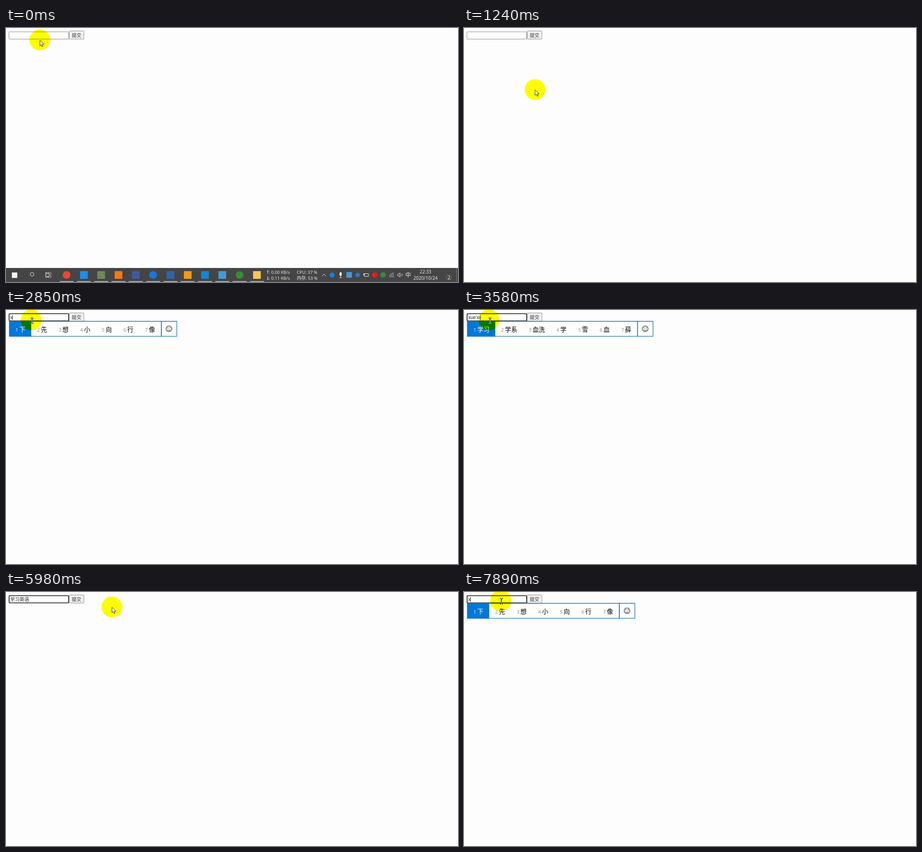
An HTML page with a canvas that plays this animation: 998x561 px, repeating every 8000 ms.

```html
<!DOCTYPE html>
<html lang="zh-CN">
<head>
<meta charset="utf-8">
<title>拼音输入</title>
<style>
  html, body { margin: 0; width: 100%; height: 100%; overflow: hidden; background: #fdfdfd; }
  canvas { display: block; width: 998px; height: 561px; }
</style>
</head>
<body>
<canvas id="stage" width="998" height="561"></canvas>
<script>
const ctx = document.getElementById('stage').getContext('2d');
const LOOP = 8000;
const CJK = '"Noto Sans CJK SC", "Noto Sans CJK", sans-serif';
const FIELD = '10.4px "Liberation Sans", ' + CJK;
const UI = '"Open Sans", "Noto Sans", ' + CJK;
const WHITE = '#f4f4f4';

const TASKBAR_END = 790;
const FOCUS_IN = 1800, SUBMIT = 6240, FOCUS_AGAIN = 7320;
const CLICKS = [705, FOCUS_IN, SUBMIT, FOCUS_AGAIN];

// each move: start, duration, end point
const MOVES = [
  [40, 260, 45, 22], [440, 260, 181, 163], [1100, 500, 57, 24], [1700, 100, 55.5, 22],
  [5780, 200, 234, 33], [6050, 150, 156, 17], [6350, 230, 318, 38], [6630, 340, 81, 19]
];

// one key per step; the text is committed at `end`
const WORDS = [
  { start: 2760, step: 205, end: 3680, before: '', done: '学习', keys: [
    ['x', '下 先 想 小 向 行 像'],
    ['xu', '需 许 续 徐 序 须 虚'],
    ['xue', '学 雪 血 薛 穴 靴 削'],
    ["xue'x", '学校 学习 学系 血型 学习下 学习者 雪下'],
    ["xue'xi", '学习 学系 血洗 学 雪 血 薛']] },
  { start: 4140, step: 128, end: 4950, before: '学习', done: '学习英语', keys: [
    ['y', '一 有 也 要 以 又 用'],
    ['yi', '一 以 已 亿 意 易 依'],
    ['yin', '因 音 引 印 银 饮 阴'],
    ['ying', '应 英 赢 影 * 硬 营'],
    ["ying'y", '应用 英语 营业 影院 英语课 营养学 应用题'],
    ["ying'yu", '英语 应于 盈余 应与 硬玉 英 应']] },
  { start: 7760, step: 200, end: LOOP, before: '', done: '', keys: [
    ['x', '下 先 想 小 向 行 像']] }
];

function rect(x, y, w, h, color) {
  ctx.fillStyle = color;
  ctx.fillRect(x, y, w, h);
}

function box(x, y, w, h, color, width = 1, radius = 0) {
  ctx.strokeStyle = color;
  ctx.lineWidth = width;
  ctx.beginPath();
  ctx.roundRect(x, y, w, h, radius);
  ctx.stroke();
}

function disc(x, y, r, color, ry = r, tilt = 0) {
  ctx.fillStyle = color;
  ctx.beginPath();
  ctx.ellipse(x, y, r, ry, tilt, 0, 7);
  ctx.fill();
}

function ring(x, y, r, color, width = 1, from = 0, to = Math.PI * 2) {
  ctx.strokeStyle = color;
  ctx.lineWidth = width;
  ctx.beginPath();
  ctx.arc(x, y, r, from, to);
  ctx.stroke();
}

function path(x, y, d, stroke, width = 1, fill) {
  const shape = new Path2D(d);
  ctx.save();
  ctx.translate(x, y);
  if (fill) {
    ctx.fillStyle = fill;
    ctx.fill(shape);
  }
  ctx.strokeStyle = stroke;
  ctx.lineWidth = width;
  ctx.stroke(shape);
  ctx.restore();
}

function text(str, x, y, font, color, align = 'left') {
  ctx.font = font;
  ctx.fillStyle = color;
  ctx.textAlign = align;
  ctx.fillText(str, x, y);
}

function fieldWidth(str) {
  ctx.font = FIELD;
  return ctx.measureText(str).width;
}

function pointerAt(t) {
  let x = 75, y = 26.5;
  for (const [start, time, toX, toY] of MOVES) {
    const k = Math.min(1, Math.max(0, (t - start) / time));
    const ease = k * k * (3 - 2 * k);
    x += (toX - x) * ease;
    y += (toY - y) * ease;
  }
  return [x, y];
}

// field content, time of the last edit, and the open popup if any
function typingAt(t) {
  if (t >= SUBMIT && t < WORDS[2].start) return { value: '', since: FOCUS_AGAIN };
  const word = WORDS.filter(w => w.start <= t).pop();
  if (!word) return { value: '', since: FOCUS_IN };
  if (t >= word.end) return { value: word.done, since: word.end };
  const i = Math.min(word.keys.length - 1, Math.floor((t - word.start) / word.step));
  const [keys, list] = word.keys[i];
  return { value: word.before + keys, since: t, left: Math.floor(7 + fieldWidth(word.before)), list };
}

function drawForm(t, { value, since }) {
  const focused = t >= FOCUS_AGAIN || t >= FOCUS_IN && t < SUBMIT;
  rect(6, 8, 133, 17, '#fefefe');
  if (focused) box(6.8, 8.3, 131.6, 15.7, '#101010', 1.6, 1.5);
  else box(6.5, 8.5, 132, 16, '#8a8a8a', 1, 1);
  rect(139, 6.5, 33, 18.5, '#efefef');
  box(139.5, 6.5, 32.5, 18, '#8e8e8e', 1, 1);
  text('提交', 145.3, 20, '10.4px ' + CJK, '#333');
  text(value, 9.3, 20, FIELD, '#222');
  if (focused && (t - since) % 1060 < 530) {
    rect(Math.round(9.3 + fieldWidth(value)), 11, 0.9, 11, '#222');
  }
}

function drawBird(x, y) {
  disc(x, y + 1, 8, '#3b2a20', 4, -0.5);
  disc(x, y + 1, 7, '#8a4f2c', 3, -0.5);
  disc(x - 1, y - 2, 6, '#8a4f2c', 2.2, -0.3);
  disc(x + 5.5, y - 2.5, 2, '#e6e0da');
}

function drawSmile(x, y) {
  ring(x, y, 6.3, '#111', 1.1);
  ring(x, y + 0.3, 3.5, '#111', 1, 0.4, Math.PI - 0.4);
  for (const side of [-1, 1]) disc(x + side * 2.3, y - 2, 0.9, '#111');
}

function drawPopup(left, list) {
  const items = list.split(' ');
  const widths = items.map(s => s === '*' ? 53 : 34.3 + 13.4 * s.length);
  const sep = left + widths.reduce((a, b) => a + b) + 2;
  rect(left, 25, sep + 35 - left, 33.5, '#fdfdfd');
  rect(left, 25, widths[0] + 1, 33.5, '#0078d7');
  let x = left + 14;
  items.forEach((item, i) => {
    text(i + 1, x, 47.5, '10px ' + UI, i ? '#858585' : '#fff');
    if (item === '*') drawBird(x + 17.5, 43.5);
    else text(item, x + 8.2, 48.3, '13.6px ' + CJK, i ? '#000' : '#fff');
    x += widths[i];
  });
  drawSmile(sep + 17, 41.5);
  box(left + 0.3, 25, sep - left, 33.2, '#1874bd', 1.3);
  box(sep, 25, 34.3, 33.2, '#1874bd', 1.3);
}

const APPS = '#e94a35 #1f8eea #6d8a58 #f07b12 #4458a0 #1677dc #2f64ad #f59a19 #1787d0 #419bd0 #3a8c35 #f5c758'.split(' ');

const TRAY = [
  x => disc(x, 545.5, 5.5, '#1681d8'),
  x => {
    disc(x, 543.5, 2.4, WHITE, 4.2);
    rect(x - 0.5, 547, 1, 4, WHITE);
    rect(x - 2.5, 551, 5, 1, WHITE);
  },
  x => rect(x - 6.2, 539, 12.5, 12.5, '#4297d8'),
  x => disc(x, 545.5, 5, '#2f78c4'),
  x => {
    box(x - 4, 542.5, 9, 6, WHITE);
    rect(x - 6, 542, 2, 4, WHITE);
  },
  x => disc(x, 545.5, 6, '#ee1a1a'),
  x => disc(x, 545.5, 6, '#3a8c35'),
  x => [1, 3.5, 6.5, 9.5].forEach(r => ring(x + 4.5, 550.5, r, '#d0d0d0', 1, Math.PI, Math.PI * 1.5)),
  x => {
    path(x, 545.5, 'M-5.5 -2h2l3 -2.5v9l-3 -2.5h-2z', WHITE, 0.9);
    [2.5, 5].forEach(r => ring(x, 545.5, r, '#d0d0d0', 0.9, -0.8, 0.8));
  }
];

function drawRate(y, dir, rate) {
  path(578, y, `M0 -3.7V3.7M-2 ${dir * 1.7}L0 ${dir * 3.7}L2 ${dir * 1.7}`, WHITE);
  text(`: ${rate} KB/s`, 580.5, y + 3.5, '9.5px ' + UI, WHITE);
}

function drawTaskbar() {
  rect(0, 530, 998, 31, '#454546');
  rect(13, 540, 12, 12, WHITE);
  ring(57.5, 544, 4, WHITE);
  path(54.6, 547, 'l-4 4.5', WHITE, 1.2);
  box(87.5, 542.5, 8, 6, WHITE);
  path(87.5, 539, 'M0 0v1.5h8v-1.5M0 13v-1.5h8v1.5M11.3 0v13', WHITE, 0.9);

  APPS.forEach((color, i) => {
    const x = 133.8 + i * 38.2;
    if (i % 5) rect(x - 8.5, 537, 17, 17, color);
    else disc(x, 545.5, 8.5, color);
    rect(x - 15.5, 559, 31, 2, '#76b9ed');
  });

  drawRate(539.2, -1, '0.00');
  drawRate(552.2, 1, '0.11');
  text('CPU: 37 %', 642, 542.7, '9.7px ' + UI, WHITE);
  text('内存: 53 %', 642, 555.7, '9.7px ' + UI, WHITE);

  path(702, 543.5, 'M-4.5 4.5L0 0l4.5 4.5', WHITE);
  TRAY.forEach((icon, i) => icon(720 + i * 18.8));
  text('中', 888, 550, '12px ' + CJK, WHITE, 'center');
  text('22:33', 926.3, 542, '10px ' + UI, WHITE, 'center');
  text('2020/10/24', 926.3, 555.7, '10.1px ' + UI, WHITE, 'center');

  path(966, 539.5, 'h13v10h-6l-3.5 3v-3h-3.5z', WHITE, 0.5, WHITE);
  for (let y = 542; y < 548; y += 2.5) rect(968, y, 9, 0.8, '#555');
  disc(978, 551, 6, '#454546');
  ring(978, 551, 5.5, '#8a8a8a', 0.8);
  text('2', 978, 554.6, '10px ' + UI, '#fff', 'center');
  rect(994.5, 530, 1, 31, '#858585');
}

function drawIBeam(x, y) {
  const cx = Math.round(x + 1), top = Math.round(y - 5.5);
  ctx.globalCompositeOperation = 'difference';
  for (const edge of [top, top + 12]) {
    rect(cx - 3, edge, 3, 1, '#fff');
    rect(cx + 1, edge, 3, 1, '#fff');
  }
  rect(cx - 0.3, top + 1, 1.6, 11, '#fff');
  ctx.globalCompositeOperation = 'source-over';
}

function drawPointer(t) {
  const [x, y] = pointerAt(t);
  ctx.globalCompositeOperation = 'multiply';
  disc(x, y, 23, '#ff0');
  ctx.globalCompositeOperation = 'source-over';
  if (CLICKS.some(c => t >= c && t < c + 85)) ring(x, y, 4.7, '#f00000', 2.2);
  const overField = x > 6 && x < 139 && y > 8 && y < 25;
  if (overField) drawIBeam(x, y);
  else path(x, y + 0.5, 'M0 0v12.2l2.8 -2.5l2 4.3l1.9 -.9l-1.8 -4.1h3.9z', '#111', 0.9, '#fff');
}

function draw(t) {
  const typing = typingAt(t);
  rect(0, 0, 998, 561, '#fdfdfd');
  drawForm(t, typing);
  if (t < TASKBAR_END) drawTaskbar();
  if (typing.list) drawPopup(typing.left, typing.list);
  drawPointer(t);
}

const start = performance.now();
function tick() {
  draw((performance.now() - start) % LOOP);
  requestAnimationFrame(tick);
}
tick();
</script>
</body>
</html>
```
